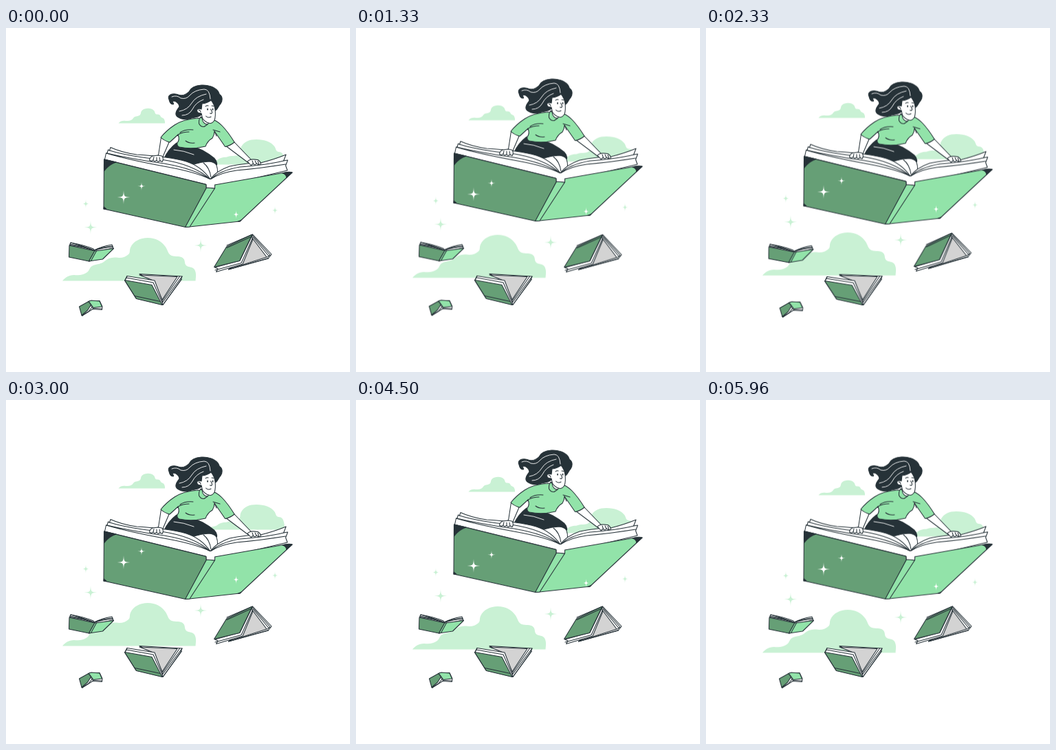
Animation, 500 px wide and 500 px high, one loop 6 s. Source, as an HTML page:

```html
<!DOCTYPE html>
<html lang="en">
<head>
<meta charset="utf-8">
<title>Flying book</title>
<style>
  html, body { margin: 0; width: 100%; height: 100%; overflow: hidden; background: #fff; }
  svg { display: block; width: 100%; height: 100%; }
  .float { animation: float 3s linear infinite; }
  .drift { animation: float 6s linear infinite; }
  .sway { transform-origin: 239px 359px; animation: sway 3s linear infinite; }
  @keyframes float { 50% { transform: translateY(-10px); } }
  @keyframes sway {
    25% { transform: rotate(1deg); }
    75% { transform: rotate(-1deg); }
  }
  .ink { stroke: #263238; stroke-width: 1.05; stroke-linejoin: round; stroke-linecap: round; fill: none; }
  .ink .paper { fill: #fff; }
  .ink .light { fill: #92e3a9; }
  .ink .deep { fill: #669f76; }
  .ink .inside { fill: #d3d3d3; }
  .ink .dark { fill: #263238; }
  .ink .shine { stroke: #fff; stroke-width: .9; }
  .pale { fill: #c9f1d4; }
  .white { fill: #fff; }
</style>
</head>
<body>
<svg viewBox="0 0 500 500">
  <defs>
    <path id="star" d="M0-10C.4-1 1-.4 9.3 0C1 .4 .4 1 0 10C-.4 1-1 .4-9.3 0C-1-.4-.4-1 0-10Z"/>
  </defs>

  <!-- clouds and pale stars -->
  <g class="drift pale">
    <path d="M82 367.400C86 363 91 359 99 359C107 360 112 359 118 355C122 352 121 347 127 345C133 343 138 343 142 340C147 335 153 333 160 333.500C167 335 174 333 178 329C181 326 179 324 181 319C185 310 195 305 206 305C218 305 226 310 231 317C235 322 235 327 239 330C244 333 251 331 256 333.500C262 337 258 343 263 346C267 348 271 347 274 351C277 356 276 362 275.500 367.400Z"/>
    <path d="M163.500 138.500C166 135 170 134.500 174 135C180 135.500 183 134 185 131C187 127.500 191 129 194 127C197 125 195 122 198 119.500C202 116 211 115.500 215 120C217 122 216 125 219 125.500C222 125 224 126 225 129C226 131 229 130 230 133C231 135 231 136.500 231 138.500Z"/>
    <path d="M292 198.400C297 193 302 195 307 192C311 188 317 188 321 187.500C327 185 333 187 338 184C342 181 339 177 342 172.500C346 165 354 162 364 162C376 162 386 166 390.500 172.500C393 177 392 179 396 180C401 180 403 183 404 188C405 192 405 195 404 198.400Z"/>
    <use href="#star" transform="translate(116 255.500) scale(.65)"/>
    <use href="#star" transform="translate(123 289.700)"/>
    <use href="#star" transform="translate(283 316)"/>
    <use href="#star" transform="translate(391 265) scale(.63)"/>
  </g>

  <!-- small books -->
  <g class="sway ink">
    <g>
      <path class="paper" d="M92.500 316L94 312Q112 315 127 321L128.500 323Q140 317 154 315L156 320L130 325Z"/>
      <path d="M93 314Q112 317 128 323Q140 318 155 317M94 312Q116 318 128 323M93 315.500Q112 318 128 323.500Q142 319 155 318.500"/>
      <path class="deep" d="M92 316L91.500 333L120.500 339L129 324Z"/>
      <path class="light" d="M131 324L156.500 320.500L140.500 336L120.500 339Z"/>
      <path class="light" d="M129 324H131.500L123.500 338.500L120.500 339Z"/>
    </g>
    <g>
      <path class="paper" d="M194 357.500L256 361L253.500 367L228 402.500L217 369Z"/>
      <path class="inside" d="M194 359L249 361.500L227 395L215 367.500Z"/>
      <path d="M256 361L227.500 399M255.500 365L228 402.500M252.500 361L227 397"/>
      <path class="paper" d="M176 360.500L216 367L227.500 397L227 402L189 393L172.500 367Z"/>
      <path d="M175 363L214 370L227 399M176 360.500L174 365"/>
      <path class="deep" d="M172.500 366.500L212 373.500L227 402.500L189.500 393.500Z"/>
      <path d="M187 389.500L224.500 397.500"/>
    </g>
    <g>
      <path class="paper" d="M358.500 300L386 329L381.500 334.500L323.500 351L344 338Z"/>
      <path class="inside" d="M358.500 306L379 333L324 350.500L343 338Z"/>
      <path d="M358.500 301.500L384 330L380 333M323.500 351L381.500 335M359 304L382 331.500"/>
      <path class="paper" d="M303.500 348L340 338L357.500 302L358.500 308L344 343L305.500 354.500L308 350Z"/>
      <path d="M304 352L342 341.500L358.500 305"/>
      <path class="deep" d="M302.500 347.500L320.500 318L358 300L339.500 338.500Z"/>
      <path d="M321 316L357 300.500M321 319.500L356 303.500"/>
    </g>
    <g>
      <path class="paper" d="M121.500 396.500L136 396.500L140 405L139.500 409.500L126 408.500L119 413L110.500 418.500Z"/>
      <path d="M122 402L126.500 407.500L139.500 408M110 417.500L119.500 412.500L125.500 405"/>
      <path class="deep" d="M106.500 405L120 397.500L123.500 402.500L118.500 410.500L110 417.500Z"/>
      <path class="light" d="M119.500 397.500L124 396L136 397L139.500 405L127 406.500L122 399.500Z"/>
    </g>
  </g>

  <g class="float ink">
    <!-- thighs and skirt -->
    <path class="paper" d="M262 194Q278 190 300 192Q308 198 307.500 210L297 220Z"/>
    <path class="dark" d="M248 167Q236 176 229.500 190L256 194L273 198Q284 194.500 295 194Q302 194.500 306.500 199Q307 194 303 189.500Q296 183.500 286 178Q278 174 272 173Z"/>
    <path class="shine" d="M244 177Q258 178 273 184"/>
    <path d="M287 196Q296 203 298 217"/>

    <!-- arms -->
    <path class="paper" d="M225.500 159L221.500 185L213 187Q209 189 209.500 194L227 196L228 187L237 166Z"/>
    <path class="paper" d="M319 171L355 198L370 199Q370 193 365 191.500L356 191L331 165Z"/>

    <!-- sweater -->
    <path class="light" d="M279 131Q258 132.500 245 141Q233 149 225 159Q230 164 238 166L250 155Q253 162 249 167Q248 171 252 173Q270 177 290 172Q293 164 300 160Q303 155 303 150L318.500 172.500Q326 171 332 166Q323.500 152 314.500 142.500Q308 136 302 133.500Z"/>
    <path d="M253 152Q260 147 272 148M250 155Q257 151 266 151M261 164Q266 168 274 167M303 150L306 157M301 148L311 151"/>
    <path class="paper" d="M283 129Q281 135 284 139Q287 143 293 140L298 134Z"/>
    <path class="light" d="M282.500 130Q280 133 280.500 139Q283 144 288 143.500L293 140Q286 140 285 131Z"/>

    <!-- hair -->
    <path class="dark" d="M237 104C234 98 241 94 249 96.500C256 99.500 261 97.500 266 92.500C269 86 276 83.500 284 83C293 82.500 303 85 308 91.500C310 94 309 95 311 97C315 100 315 106 312 110C308.500 113 309 117 304.500 120L284 126C279 131 272 129.500 267 132C258 134 249 131 247 126C246 121 250 118 252 114C252 110 247 106 243 106C241 108 245 110 243 111C239 111 238 108 237 104Z"/>
    <path class="shine" d="M241 100Q248 97 254 102Q262 104 267 98Q274 90 288 89Q296 89 297 103M252 121Q264 119 270 109Q276 99 291 96M256 127Q266 127 271 118Q276 108 287 104"/>

    <!-- face -->
    <path class="paper" d="M285 110Q293 109 298 105Q303 111 304 119Q305 128 303 134Q300 139 296 138.500Q289 137 285.500 131L284 124Q278 124 277.500 120Q278 116 284 118Z"/>
    <path d="M280 119Q282 119 283 122M290 114Q292 112 294 113M299 113L302 113.500M297.500 118Q301 123 298.500 124.500L296.500 124M290.500 128Q294 131.500 298 129"/>
    <path d="M293 117.500v1.200M300.500 117.500v1.200" stroke-width="1.700"/>

    <!-- pages -->
    <path class="paper" d="M143.500 191L145.500 182L147 182L148.500 177L150.500 178L152 173.500Q168 181 190 184Q238 187 262 194Q284 201 297 220Q305 208 325 201Q350 196 370 196Q390 191 407 184L403.500 193L409.500 192L406.500 200L409 207L303 232L291 232L290 227Z"/>
    <path d="M150.500 178Q180 187 225 191Q273 198 297 220M147 182Q180 190 230 197Q275 205 297 220M145.500 182Q180 192 235 202Q278 210 297 220M403.500 193Q380 199 340 202Q311 207 297 220M406.500 198Q370 204 335 207Q312 210 297 220"/>

    <!-- covers -->
    <path class="deep" d="M142.500 191L291 227.500L291.500 232L261 289.500L142 263Z"/>
    <path class="light" d="M303.500 228L406 210L416 210L340 281L262 289.500L303 233Z"/>
    <path class="light" d="M291.500 232L303.500 233L267 289L260.500 289.500Z"/>
    <path class="paper" d="M291 222L297 220L303 221L303.500 233L291.500 232Z" stroke="none"/>
    <path d="M291 227.500V232L303.500 233V228"/>
    <path class="dark" d="M142.500 191L160 195Q150 198 142.500 208ZM142.300 260L146 263.500L142 263ZM402 211Q411 208 416 210L407.500 217.500Q408 213 402 211ZM337 281.200L342 279.200L340 281Z"/>

    <!-- hands -->
    <path class="paper" d="M213 186Q209 188 208.500 192L211 193.500L214 192L216 194L219 192.500L221 194.500L224 193L227 194.500Q230 190 226.500 186L221 185Z"/>
    <path d="M215 187.500L214 192M219 188L219 192.500M223 188L224 193"/>
    <path class="paper" d="M351 194Q354 190.500 360 191L366 191.500Q370 194 370.500 198L367 198.500L364 197L362 199L359 197.500L356 199.500Z"/>
    <path d="M358 193L359.500 197.500M362 193L364 197M366 193.500L367.500 198"/>
  </g>

  <g class="drift white">
    <use href="#star" transform="translate(171 246)"/>
    <use href="#star" transform="translate(197 230) scale(.62)"/>
    <use href="#star" transform="translate(334.500 271) scale(.63)"/>
  </g>
</svg>
</body>
</html>
```
